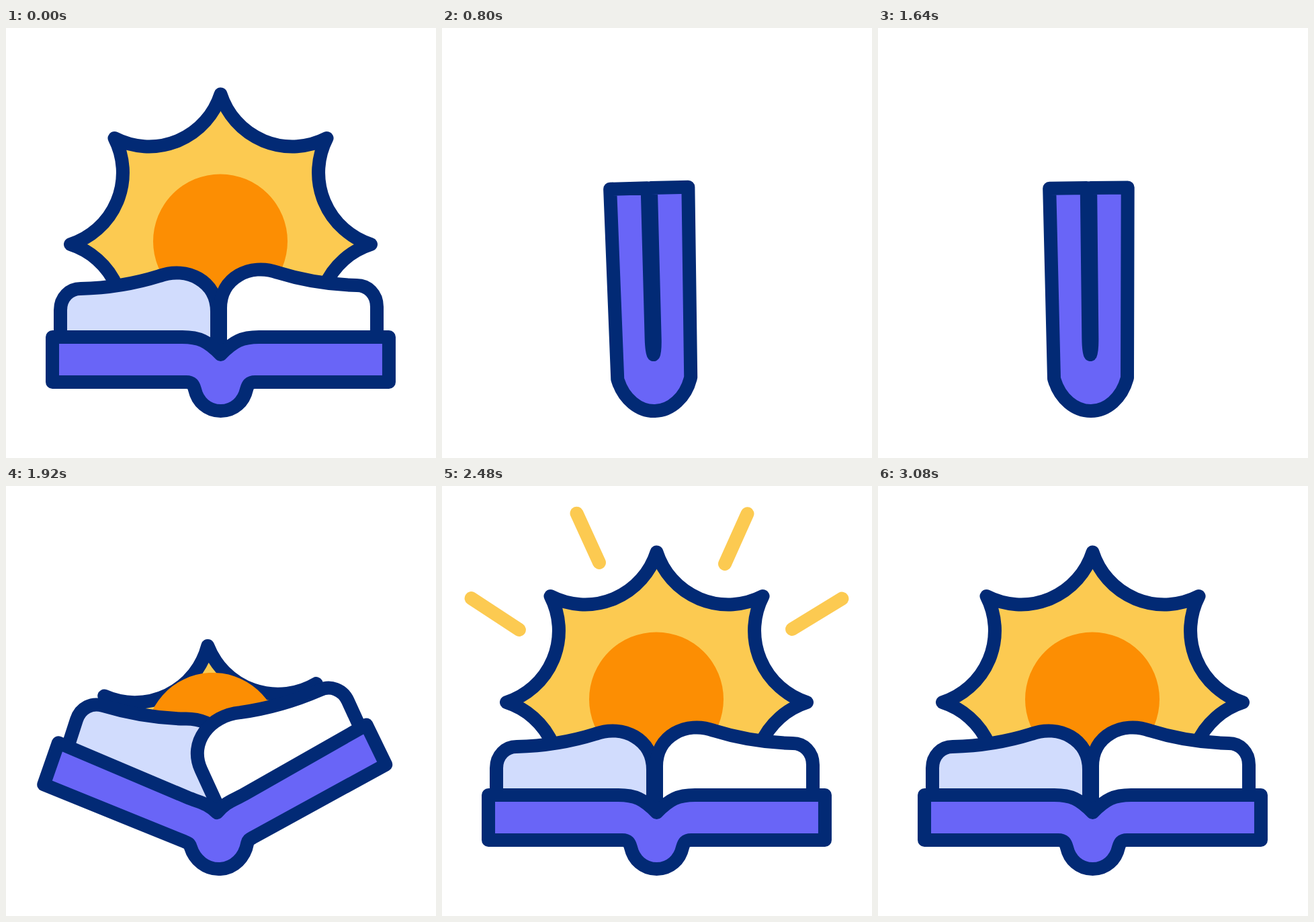
Recreate the animation shown at these times as an HTML page. Size 640 by 640 pixels, loop 3.76 s.

```html
<!DOCTYPE html>
<html lang="en">
<head>
<meta charset="utf-8">
<title>Book and sunrise</title>
<style>
  html, body { margin: 0; width: 100%; height: 100%; overflow: hidden; background: #fff; }
  svg { display: block; width: 100%; height: 100%; }
  .line { stroke: #022a75; stroke-width: 20; stroke-linecap: round; stroke-linejoin: round; }
</style>
</head>
<body>
<svg viewBox="0 0 640 640">
  <defs><clipPath id="opening"><path id="openingShape"/></clipPath></defs>
  <g id="rays" stroke="#fcca51" stroke-linecap="round"></g>
  <g id="book">
    <g clip-path="url(#opening)">
      <path id="star" class="line" fill="#fcca51"/>
      <circle id="core" cx="319" cy="317.5" r="100" fill="#fc8e03"/>
    </g>
    <path id="leftPage" class="line" fill="#d1dcfd"/>
    <path id="rightPage" class="line" fill="#fff"/>
    <path id="cover" class="line" fill="#6965f7"/>
  </g>
</svg>
<script>
const LOOP = 3760, STEP = 40;
const $ = id => document.getElementById(id);
const set = (el, attrs) => { for (const k in attrs) el.setAttribute(k, attrs[k]); };
const clamp = v => Math.max(0, Math.min(1, v));
const lerp = (a, b, u) => a + (b - a) * u;
const span = (t, a, b) => clamp((t - a) / (b - a));
const sine = u => 0.5 - 0.5 * Math.cos(Math.PI * u);
const cubic = u => u < 0.5 ? 4 * u ** 3 : 1 - 4 * (1 - u) ** 3;
const rad = deg => deg * Math.PI / 180;

// Inner end and outermost end of each ray.
const RAYS = [
  [234, 114, 189, 15.5], [421, 116, 466, 15.5],
  [115, 214, 19, 151], [521, 213, 621, 152]
];
const rayLines = RAYS.map(() =>
  $('rays').appendChild(document.createElementNS('http://www.w3.org/2000/svg', 'line')));

function starPath() {
  let d = '';
  for (let i = 0; i <= 8; i++) {
    const a = rad(i * 45 - 90);
    const tip = `${319.5 + 223.5 * Math.cos(a)} ${322 + 223.5 * Math.sin(a)}`;
    d += i ? `A112 112 0 0 0 ${tip}` : `M${tip}`;
  }
  return d + 'Z';
}
set($('star'), { d: starPath() });

// 0 = open, 1 = shut
const foldAt = t => t < 1400 ? cubic(span(t, 560, 795)) : 1 - cubic(span(t, 1620, 2119));

function tiltAt(t) {
  if (t < 620) return 8.6 * sine(span(t, 400, 620));
  if (t < 900) return lerp(8.6, -4.3, sine(span(t, 620, 880)));
  if (t < 1400) return lerp(-4.3, 0, sine(span(t, 920, 1170)));
  return -3.35 * Math.sin(Math.PI * span(t, 1605, 2200));
}

// How far the sun has sunk: 0 = fully risen, 1 = hidden
const sinkAt = (t, s) => t < 1400 ? s ** 0.67 : (1 - span(t, 1640, 2416)) ** 2;

function pagePath(m, s) {
  const a = rad(84 * s);
  const bulge = Math.sin(Math.PI * s);
  const cx = 316.5 + 7 * bulge;
  const long = 1 + 0.05 * bulge;
  const high = 1 - 0.72 * span(s, 0.26, 0.9);
  const p = (x, y) => {
    const u = x * long, v = (m < 0 ? y + 5 : y) * high;
    const px = u * Math.cos(a) + v * Math.sin(a);
    const py = -u * Math.sin(a) + v * Math.cos(a);
    return `${cx + m * px} ${486 + py} `;
  };
  return 'M' + p(235.5, -17) + 'L' + p(235.5, -71) +
    'C' + p(235.5, -90) + p(222, -103) + p(205.5, -103) +
    'C' + p(160, -104) + p(120, -112) + p(88, -122) +
    'C' + p(47, -137) + p(2.5, -114) + p(2.5, -69) +
    'L' + p(2.5, 0) + 'Z';
}

function coverCorners(s) {
  const bulge = 10 * Math.sin(Math.PI * s);
  const polar = (r, deg) => [r * Math.cos(rad(deg)), 486 - r * Math.sin(rad(deg))];
  return {
    top: polar(lerp(251.8, 248, s) + bulge, lerp(5.93, 89.4, s)),
    base: polar(lerp(253.8, 254.7, s) + bulge, lerp(-9.3, 76.8, s))
  };
}

function coverHalf(m, cx, s, { top, base }) {
  const mix = (a, b) => [lerp(a[0], b[0], s), lerp(a[1], b[1], s)];
  const add = (a, b) => [a[0] + b[0], a[1] + b[1]];
  const along = (a, b, len) => {
    const k = len / Math.hypot(b[0] - a[0], b[1] - a[1]);
    return [b[0] + (b[0] - a[0]) * k, b[1] + (b[1] - a[1]) * k];
  };
  const p = (...pts) => pts.map(([x, y]) => `${cx + m * x} ${y}`).join(' ');
  const gutter = [0, 486];
  const bend = mix([57, 460], [2.5, 462]);
  const joint = mix([51.5, 527], [54.5, 521]);
  const hip = mix([38.5, 538], [54, 523]);
  return 'M' + p(gutter) +
    'C' + p(add(gutter, mix([19.5, -20], [2, -4])), along(top, bend, lerp(25, 10, s)), bend) +
    'L' + p(top) + 'L' + p(base) + 'L' + p(joint) +
    'C' + p(along(base, joint, 9 * (1 - s)), add(hip, mix([2, -7], [0, 0])), hip) +
    'C' + p(add(hip, mix([-4, 18], [-8, 28])), mix([20, 570], [24, 570]), [0, 570]);
}

function drawRays(t) {
  const head = cubic(span(t, 2180, 2680));
  const tail = cubic(span(t, 2440, 3080));
  RAYS.forEach(([x1, y1, x2, y2], i) => {
    const len = (head - tail) * Math.hypot(x2 - x1, y2 - y1);
    set(rayLines[i], {
      x1: lerp(x1, x2, tail), y1: lerp(y1, y2, tail),
      x2: lerp(x1, x2, head), y2: lerp(y1, y2, head),
      'stroke-width': Math.min(20, 4 * len),
      visibility: len > 0.05 ? 'visible' : 'hidden'
    });
  });
}

function draw(t) {
  const s = foldAt(t), sink = sinkAt(t, s);
  const cx = lerp(319.5, 317, s);
  const corners = coverCorners(s);
  const [tx, ty] = corners.top;
  set($('book'), { transform: `rotate(${tiltAt(t)} 319 569)` });
  set($('openingShape'), {
    d: `M${cx - tx} -100V${ty}L${cx} 486L${cx + tx} ${ty}V-100Z`
  });
  set($('star'), { transform: `translate(0 ${340 * sink})` });
  set($('core'), { transform: `translate(0 ${147 * sink})` });
  set($('leftPage'), { d: pagePath(-1, s) });
  set($('rightPage'), { d: pagePath(1, s) });
  set($('cover'), { d: coverHalf(-1, cx, s, corners) + coverHalf(1, cx, s, corners) });
  drawRays(t);
}

function tick() {
  const t = performance.now() % LOOP;
  draw(Math.floor(t / STEP) * STEP);
  requestAnimationFrame(tick);
}
tick();
</script>
</body>
</html>
```
